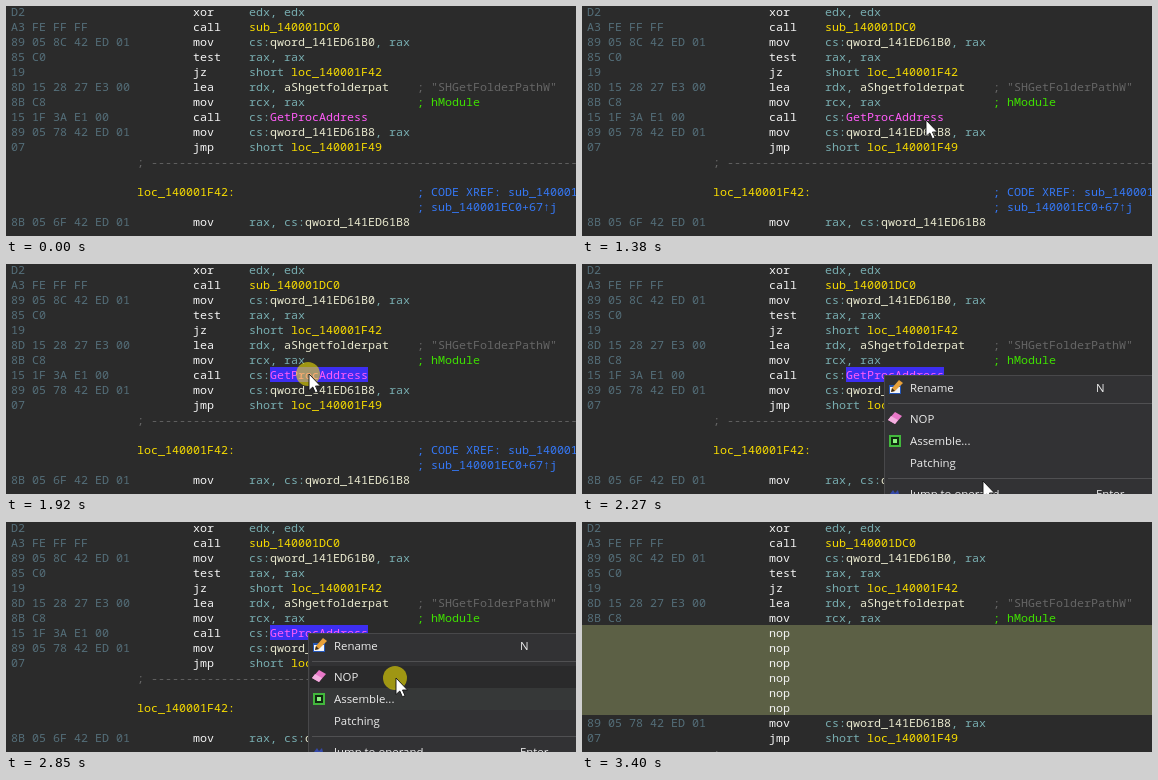
These frames come from a looping animation (570 by 230 pixels, 5.06 s). An HTML page with a canvas:

```html
<!DOCTYPE html>
<html lang="en">
<head>
<meta charset="utf-8">
<title>Patching a call with NOPs</title>
<style>
html, body { margin: 0; width: 100%; height: 100%; overflow: hidden; background: #2b2b2b; }
canvas { display: block; width: 570px; height: 230px; }
</style>
</head>
<body>
<canvas id="stage" width="570" height="230"></canvas>
<script>
const g = document.getElementById('stage').getContext('2d');
const LOOP = 5060, CELL = 7, ROW = 15;
const MONO = '11.667px "Noto Sans Mono", "DejaVu Sans Mono", monospace';
const UI = '11.4px "Open Sans", "Noto Sans", sans-serif';
const C = {
  bg: '#2b2b2b', hex: '#546e79', op: '#f4f4f4', reg: '#78adb0', name: '#e9e9cf',
  code: '#f8dc00', api: '#ff5cf8', note: '#666666', hint: '#3fe000', xref: '#3578f6',
  band: '#5c6045', select: '#3d2ef2', menu: '#323234', hover: '#2a2a2b', line: '#505052', ui: '#ececec'
};

// Bytes, mnemonic, operands, comment, comment colour
const head = [
  ['D2', 'xor', 'edx, edx'],
  ['A3 FE FF FF', 'call', 'sub_140001DC0'],
  ['89 05 8C 42 ED 01', 'mov', 'cs:qword_141ED61B0, rax'],
  ['85 C0', 'test', 'rax, rax'],
  ['19', 'jz', 'short loc_140001F42'],
  ['8D 15 28 27 E3 00', 'lea', 'rdx, aShgetfolderpat', '; "SHGetFolderPathW"', C.note],
  ['8B C8', 'mov', 'rcx, rax', '; hModule', C.hint]
];
const call = ['15 1F 3A E1 00', 'call', 'cs:GetProcAddress'];
const store = ['89 05 78 42 ED 01', 'mov', 'cs:qword_141ED61B8, rax'];
const jump = ['07', 'jmp', 'short loc_140001F49'];
const load = ['8B 05 6F 42 ED 01', 'mov', 'rax, cs:qword_141ED61B8'];
const nops = Array.from({ length: 6 }, () => ['', 'nop', '']);

const before = [...head, call, store, jump];
const after = [...head, ...nops, store, jump];

function rect(x, y, w, h, color) {
  g.fillStyle = color;
  g.fillRect(x, y, w, h);
}

function poly(points, color) {
  g.beginPath();
  points.forEach(([x, y]) => g.lineTo(x, y));
  g.closePath();
  g.fillStyle = color;
  g.fill();
}

function put(row, col, text, color) {
  g.font = MONO;
  g.fillStyle = color;
  g.fillText(text, 5 + col * CELL, row * ROW + 10);
}

function tokenColor(word) {
  if (/^(sub|loc)_/.test(word)) return C.code;
  if (/^(qword_|aSh)/.test(word)) return C.name;
  return word.startsWith('Get') ? C.api : C.reg;
}

function drawRow([bytes, op, args, note, noteColor], row) {
  put(row, 0, bytes, C.hex);
  put(row, 26, op, C.op);
  for (const m of args.matchAll(/cs:|\w+|,/g)) put(row, 34 + m.index, m[0], tokenColor(m[0]));
  if (note) put(row, 58, note, noteColor);
}

function drawRule(row) {
  put(row, 18, '; ' + '-'.repeat(64), C.note);
}

function drawListing(patched, selected) {
  rect(0, 0, 570, 230, C.bg);
  if (patched) {
    rect(0, 103, 570, 90, C.band);
    after.forEach(drawRow);
    drawRule(15);
    return;
  }
  if (selected) rect(264, 103, 98, 15, C.select);
  before.forEach(drawRow);
  drawRule(10);
  put(12, 18, 'loc_140001F42:', C.code);
  put(12, 58, '; CODE XREF: sub_140001EC0', C.xref);
  put(13, 58, '; sub_140001EC0+67↑j', C.xref);
  drawRow(load, 14);
}

function drawIcons() {
  // Rename
  rect(307, 121, 12, 9, '#2456b8');
  rect(308, 123, 10, 6, '#f2f5fc');
  poly([[317, 116], [321, 119], [313, 127], [309, 128], [310, 124]], '#e8a13a');
  poly([[310, 124], [313, 127], [309, 128]], '#3a2a18');
  // Eraser
  poly([[313, 148], [320, 152], [313, 160], [306, 156]], '#e878c8');
  poly([[309, 152], [316, 156], [313, 160], [306, 156]], '#f4b0e0');
  // Chip
  rect(307, 171, 12, 12, '#42b83c');
  rect(309, 173, 8, 8, '#102810');
  rect(311, 175, 4, 4, '#8cf080');
  // Jump
  poly([[308, 230], [311, 226], [313, 229], [316, 226], [317, 230]], '#3448a8');
}

function label(text, x, y) {
  g.fillText(text, x, y);
}

function drawMenu(hover) {
  rect(302, 111, 268, 119, '#48484a');
  rect(303, 112, 267, 118, C.menu);
  if (hover >= 0) rect(304, 144 + hover * 22, 266, 22, C.hover);
  if (hover === 0) rect(304, 166, 266, 22, '#363838');
  rect(306, 139, 264, 1, C.line);
  rect(306, 214, 264, 1, C.line);
  drawIcons();
  g.font = UI;
  g.fillStyle = C.ui;
  label('Rename', 328, 128);
  label('N', 514, 128);
  label('NOP', 328, 159);
  label('Assemble...', 328, 181);
  label('Patching', 328, 203);
  label('Jump to operand', 328, 234);
  label('Enter', 514, 234);
}

function drawClick(x, y) {
  g.beginPath();
  g.arc(x - 1, y, 12, 0, Math.PI * 2);
  g.fillStyle = 'rgba(255, 238, 0, 0.55)';
  g.fill();
}

function drawPointer(x, y) {
  const shape = [[0, 0], [0, 16.5], [3.8, 13], [6.4, 18.8], [9, 17.7], [6.5, 12], [11.5, 12]];
  poly(shape.map(([a, b]) => [x + a, y + b]), '#fff');
  g.strokeStyle = '#111';
  g.lineWidth = 0.9;
  g.stroke();
}

// Progress through a move, held in equal steps
function progress(t, start, end, steps) {
  const p = Math.min(1, Math.max(0, (t - start) / (end - start)));
  return Math.floor(p * steps + 1e-6) / steps;
}

const ease = p => p * p * (3 - 2 * p);
const mix = (a, b, p) => a + (b - a) * p;

function bezier(a, b, c, d, p) {
  const q = 1 - p;
  return q * q * q * a + 3 * q * q * p * b + 3 * q * p * p * c + p * p * p * d;
}

function pointerAt(t) {
  if (t < 1190 || t >= 3070) return null;
  if (t < 1930) {
    const p = progress(t, 1190, 1650, 7);
    return [bezier(361, 345, 312, 303, p), bezier(169, 90, 58, 110, p)];
  }
  if (t < 2390) {
    const p = ease(progress(t, 1930, 2270, 5));
    return [mix(303, 401, p), mix(110, 217, p)];
  }
  if (t < 2990) {
    const p = ease((1 + 4 * progress(t, 2390, 2700, 4)) / 5);
    return [mix(401, 390, p), mix(217, 156, p)];
  }
  return [395, 182];
}

function hoverAt(t, y) {
  if (t < 2390 || y >= 210) return -1;
  return Math.max(0, Math.floor((y - 144) / 22));
}

function draw(t) {
  const pos = pointerAt(t);
  drawListing(t >= 2990, t >= 1800);
  if (t >= 1930 && t < 2990) drawMenu(hoverAt(t, pos[1]));
  if (t >= 2990 && t < 3400) rect(298, 103, 2, 14, '#f4f4f4');
  if (!pos) return;
  const [x, y] = pos.map(Math.round);
  if ((t >= 1800 && t < 1930) || (t >= 2775 && t < 2990)) drawClick(x, y);
  drawPointer(x, y);
}

const begin = performance.now();
function tick() {
  draw((performance.now() - begin) % LOOP);
  requestAnimationFrame(tick);
}
tick();
</script>
</body>
</html>
```
